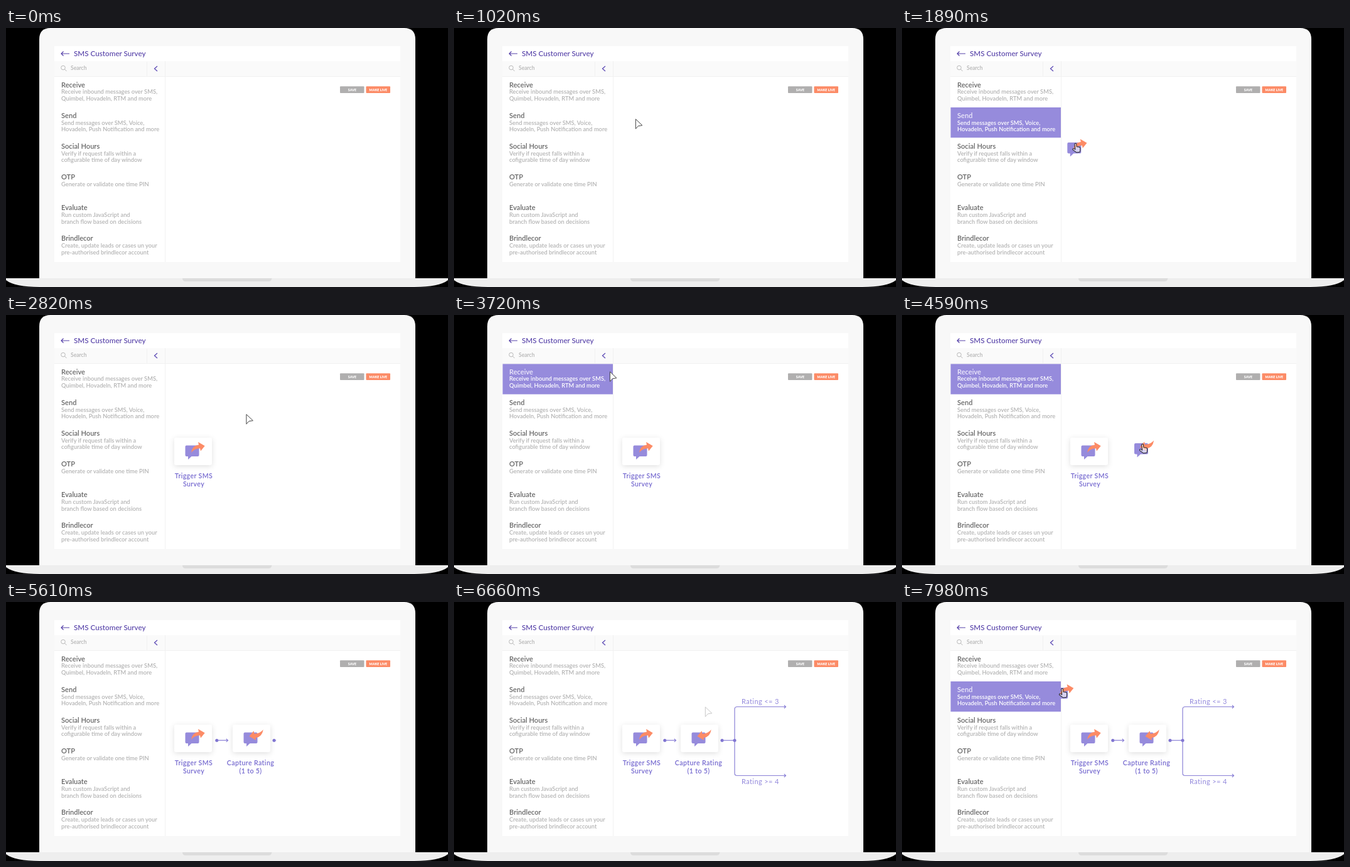
These frames come from a looping animation (704 px wide and 414 px high, 8000 ms). An HTML page:

```html
<!DOCTYPE html>
<html lang="en">
<head>
<meta charset="utf-8">
<title>Flow builder</title>
<style>
  html, body { margin: 0; width: 100%; height: 100%; overflow: hidden; background: #000; }
  svg { display: block; width: 100vw; height: 100vh; }
  text { font-family: Lato, "Open Sans", sans-serif; }
  .head { font-size: 11.7px; font-weight: 500; fill: #5540a8; }
  .title { font-size: 11.1px; font-weight: 600; fill: #666; }
  .desc { font-size: 9.3px; font-weight: 600; fill: #b3b3b3; }
  .on .title { fill: #eeebfb; }
  .on .desc { fill: #fff; }
  .button { font-size: 5.4px; font-weight: 900; fill: #fff; text-anchor: middle; }
  .label { font-size: 10.6px; font-weight: 600; letter-spacing: .38px; fill: #7468cf; text-anchor: middle; }
  .rule { font-size: 11px; letter-spacing: .4px; fill: #9389dc; }
  .line { fill: none; stroke: #8a80d6; stroke-width: 1.2; }
  .dot { fill: #7d72d0; }
  .card { fill: #fff; filter: drop-shadow(0 2px 4px rgba(0, 0, 0, .12)); }
</style>
</head>
<body>
<svg viewBox="0 0 704 414" preserveAspectRatio="none">
  <defs>
    <path id="bubble" fill="#968bdc" d="M2 0H20Q22 0 22 2V15.5Q22 17.5 20 17.5H10L4.5 22.5V17.5H2Q0 17.5 0 15.5V2Q0 0 2 0Z"/>
    <g id="send">
      <use href="#bubble"/>
      <path fill="#fc8b66" d="M9.5 11.5Q11 0 21.5-1L20.5-5.5L31.2 .8L24.5 9L23.5 4.8Q15 4.5 9.5 11.5Z"/>
    </g>
    <g id="receive">
      <use href="#bubble"/>
      <path fill="#fc8b66" d="M31.2-4.5Q29.5 7.5 18.8 8.7L19.8 12.5L9 6.2L16-2.5L17 2Q25 2.5 31.2-4.5Z"/>
    </g>
    <clipPath id="reveal"><rect id="wipe" x="332" y="215" height="12" width="0"/></clipPath>
  </defs>

  <path fill="#f8f8f8" d="M53 400V18Q53 0 71 0H634Q652 0 652 18V400Z"/>
  <path fill="#eee" d="M0 400H704V403Q690 414 650 414H54Q14 414 0 403Z"/>
  <path fill="#dcdcdc" d="M281 400H423.500Q423 405 418 405H286Q281 405 281 400Z"/>
  <rect x="77" y="29" width="551" height="345" fill="#fff"/>
  <rect x="77" y="53" width="551" height="24.500" fill="#fafafa"/>
  <path stroke="#f1f1f1" fill="none" d="M77 77.500H628M253.500 53V374M224.500 54V77"/>

  <path stroke="#5540a8" stroke-width="1.200" fill="none" d="M101 41H88M91.500 37.500L88 41L91.500 44.500"/>
  <text class="head" x="108" y="45">SMS Customer Survey</text>
  <g stroke="#b8b8b8" fill="none"><circle cx="91" cy="63.500" r="3.300"/><path d="M93.500 66L96.500 69"/></g>
  <text class="desc" x="103" y="67.300" style="font-size:8.6px">Search</text>
  <path stroke="#5d4bb5" stroke-width="1.300" fill="none" d="M241 61L236.500 65L241 69"/>

  <rect x="532" y="93.300" width="38.500" height="10.700" rx="1" fill="#b0afaf"/>
  <rect x="573.500" y="93.300" width="38.500" height="10.700" rx="1" fill="#fc8b66"/>
  <text class="button" x="551.500" y="100.700">SAVE</text>
  <text class="button" x="592.800" y="100.700">MAKE LIVE</text>

  <g id="menu"></g>
  <g id="cards"></g>

  <g clip-path="url(#reveal)">
    <circle class="dot" cx="335.800" cy="221.200" r="2.500"/>
    <path class="line" d="M336 221.200H353.500M350.800 218.800L353.500 221.200L350.800 223.600"/>
  </g>
  <g id="fork">
    <circle class="dot" id="dotA" cx="427" cy="221.200" r="2.500"/>
    <path class="line" id="stem"/>
    <circle class="dot" id="dotB" cx="447" cy="221.200" r="2.500"/>
    <path class="line branch" pathLength="1" stroke-dasharray="1 2" d="M447 221V171.500Q447 167.500 451 167.500H528.500"/>
    <path class="line branch" pathLength="1" stroke-dasharray="1 2" d="M447 221V273.500Q447 277.500 451 277.500H528.500"/>
    <path class="line" id="heads" d="M525.800 165L528.500 167.500L525.800 170M525.800 275L528.500 277.500L525.800 280"/>
    <g id="rules">
      <text class="rule" x="458" y="163.200">Rating &lt;= 3</text>
      <text class="rule" x="458" y="291.200">Rating &gt;= 4</text>
    </g>
  </g>

  <path id="arrow" fill="#fff" stroke="#444" stroke-linejoin="round" d="M0 0V15.500L4 11L10.500 10Z"/>
  <g id="drag">
    <use id="cargo" x="-13" y="-1"/>
    <path fill="#fff" fill-opacity=".6" stroke="#222" stroke-linejoin="round" transform="rotate(-7)"
      d="M-1.600 8.500V1.600A1.400 1.400 0 0 1 1.200 1.600V6L5 6.900Q6.700 7.400 6.500 9L6.100 12Q5.800 13.800 4.900 15H-.2L-5.400 10.300Q-6.200 8.900-5 8.200Q-3.800 7.800-1.600 10Z"/>
  </g>
</svg>

<script>
const LOOP = 8000;
const $ = id => document.getElementById(id);
const clamp = v => Math.max(0, Math.min(1, v));
const span = (t, from, to) => clamp((t - from) / (to - from));
const ease = p => (1 - Math.cos(Math.PI * p)) / 2;
const mix = (a, b, p) => a + (b - a) * p;
const place = (el, x, y) => el.setAttribute('transform', `translate(${x.toFixed(2)} ${y.toFixed(2)})`);
const show = (el, opacity) => el.setAttribute('opacity', opacity);

const items = [
  ['Receive', 'Receive inbound messages over SMS,', 'Quimbel, Hovadeln, RTM and more'],
  ['Send', 'Send messages over SMS, Voice,', 'Hovadeln, Push Notification and more'],
  ['Social Hours', 'Verify if request falls within a', 'cofigurable time of day window'],
  ['OTP', 'Generate or validate one time PIN', ''],
  ['Evaluate', 'Run custom JavaScript and', 'branch flow based on decisions'],
  ['Brindlecor', 'Create, update leads or cases un your', 'pre-authorised brindlecor account']
];

function itemText([title, a, b], y) {
  return `<text class="title" x="88" y="${y}">${title}</text>
    <text class="desc" x="88" y="${y + 10.6}">${a}</text>
    <text class="desc" x="88" y="${y + 21.4}">${b}</text>`;
}

$('menu').innerHTML = items.map((item, i) => {
  const y = 94.8 + i * 49.1;
  const selected = i > 1 ? '' : `<g class="on" id="on${i}">
    <rect x="77.500" y="${78.3 + i * 48.6}" width="175.500" height="48.400" fill="#968bdc"/>${itemText(item, y)}</g>`;
  return itemText(item, y) + selected;
}).join('');

const cards = [
  { x: 268, icon: 'send', mid: 299, lines: ['Trigger SMS', 'Survey'], at: 2220 },
  { x: 361, icon: 'receive', mid: 389.5, lines: ['Capture Rating', '(1 to 5)'], at: 4595 }
];

$('cards').innerHTML = cards.map((c, i) => `<g id="card${i}">
  <rect class="card" x="${c.x}" y="196" width="60" height="44" rx="3"/>
  <use href="#${c.icon}" x="${c.x + 17.5}" y="208.500"/>
  ${c.lines.map((s, n) => `<text class="label" x="${c.mid}" y="${261 + n * 12.8}">${s}</text>`).join('')}
</g>`).join('');

// Each trip: the pointer travels to a menu item, then a hand drags its icon out.
const trips = [
  { start: 140, item: 1, icon: 'send', aim: [241, 136], grab: [253.5, 134.5], drop: [286, 205] },
  { start: 2515, item: 0, icon: 'receive', aim: [241, 87], grab: [250, 87], drop: [383, 206] },
  { start: 6602, item: 1, icon: 'send', aim: [241, 136], grab: [253.5, 134.5], drop: [286, 205] }
];
const HOME = [401, 168], GRAB = 1270, DROP = 2080;

function drawTrip(t) {
  const trip = trips.find(s => t >= s.start && t < s.start + DROP);
  const age = trip ? t - trip.start : 0;
  const dragging = trip && age >= GRAB;
  show($('arrow'), trip && !dragging ? span(age, 0, 200) : 0);
  show($('drag'), dragging ? 1 : 0);
  for (const i of [0, 1]) show($('on' + i), trip && trip.item === i ? span(age, 1110, 1190) : 0);
  if (!trip) return;

  const go = ease(age / 1400);
  place($('arrow'), mix(HOME[0], trip.aim[0], go), mix(HOME[1], trip.aim[1], go));
  const pull = ease(span(age, GRAB, 2030));
  place($('drag'), mix(trip.grab[0], trip.drop[0], pull), mix(trip.grab[1], trip.drop[1], pull));
  $('cargo').setAttribute('href', '#' + trip.icon);
}

function drawLinks(t) {
  $('wipe').setAttribute('width', 23 * ease(span(t, 4810, 5235)));

  const stem = ease(span(t, 5510, 5900));
  $('dotA').setAttribute('r', 2.5 * span(t, 5440, 5590));
  $('stem').setAttribute('d', stem ? `M427 221.2H${427 + 20 * stem}` : '');
  $('dotB').setAttribute('r', 2.5 * span(t, 5850, 6000));

  const grow = ease(span(t, 5950, 6640));
  for (const branch of document.querySelectorAll('.branch')) {
    branch.setAttribute('stroke-dashoffset', 1 - grow);
    show(branch, grow ? 1 : 0);
  }
  show($('heads'), span(t, 6580, 6640));
  show($('rules'), span(t, 6380, 6640));
}

function draw(t) {
  cards.forEach((c, i) => show($('card' + i), t >= c.at ? 1 : 0));
  drawLinks(t);
  drawTrip(t);
}

const began = performance.now();
function tick() {
  draw((performance.now() - began) % LOOP);
  requestAnimationFrame(tick);
}
draw(0);
requestAnimationFrame(tick);
</script>
</body>
</html>
```
